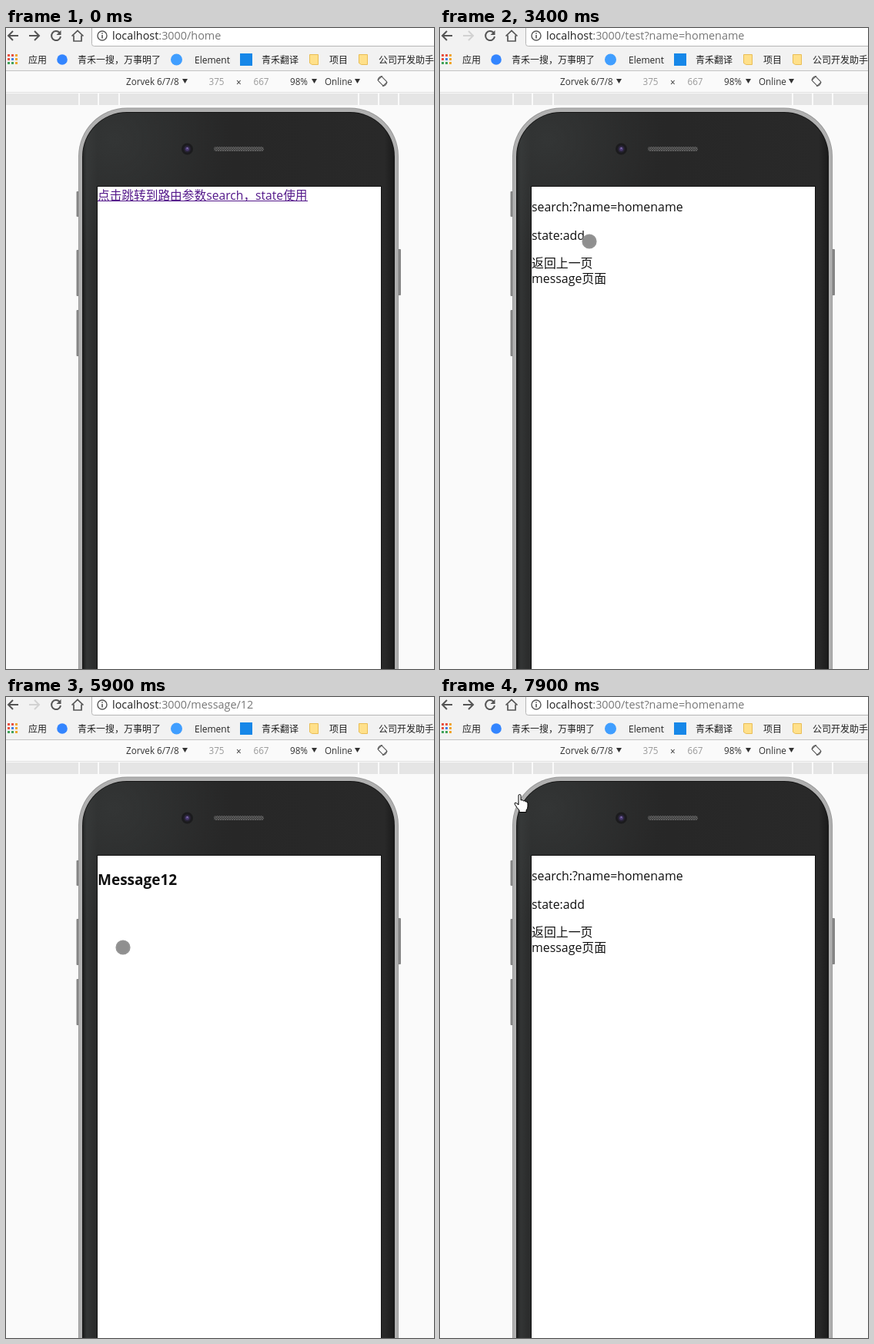
Recreate the animation shown at these times as an HTML page. Size 556 by 832 pixels, loop 8000 ms.

```html
<!DOCTYPE html>
<html lang="zh-CN">
<head>
<meta charset="utf-8">
<title>Router demo</title>
<style>
html, body { margin: 0; width: 100%; height: 100%; overflow: hidden; background: #fafafa; }
svg { display: block; width: 556px; height: 832px; }
text { font-family: "Open Sans", "Noto Sans CJK SC", "Noto Sans CJK", sans-serif; white-space: pre; }
.url { font-size: 14.4px; fill: #777; }
.url tspan { fill: #222; }
.mark { font-size: 12px; fill: #222; }
.tool { font-size: 11.7px; fill: #333; }
.dim { fill: #999; }
.page { font-size: 15.9px; fill: #111; }
.link { font-size: 15.7px; fill: #551a8b; }
.title { font-size: 19px; font-weight: 700; fill: #111; }
.icon { fill: none; stroke: #555; stroke-width: 2; }

.show { animation: 8s step-end infinite; }
#home { animation-name: home; }
#test { animation-name: test; }
#message { animation-name: message; }
#next { animation-name: next; }
#ring { animation-name: ring; }
#dot { animation-name: dot; }
#arrow { animation-name: arrow; }
#hand { animation-name: hand; }
#pointer { animation: travel 8s linear infinite; }

@keyframes home {
  0%, 52.5% { visibility: visible; }
  28.75%, 62.5%, 100% { visibility: hidden; }
}
@keyframes test {
  0%, 52.5%, 72.5% { visibility: hidden; }
  28.75%, 62.5%, 96.25%, 100% { visibility: visible; }
}
@keyframes message {
  0%, 96.25%, 100% { visibility: hidden; }
  72.5% { visibility: visible; }
}
@keyframes next {
  0%, 52.5%, 96.25%, 100% { stroke: #555; }
  28.75%, 62.5% { stroke: #d2d2d2; }
}
@keyframes ring {
  0%, 5%, 27.5%, 100% { visibility: hidden; }
  1.25%, 12.5% { visibility: visible; }
}
@keyframes dot {
  0%, 85%, 100% { visibility: hidden; }
  27.5% { visibility: visible; }
}
@keyframes arrow {
  0%, 12.5%, 98.75%, 100% { visibility: hidden; }
  5%, 85% { visibility: visible; }
}
@keyframes hand {
  0%, 100% { visibility: hidden; }
  98.75% { visibility: visible; }
}
/* Each leg advances once per 100 ms. */
@keyframes travel {
  0%, 1.25% { transform: translate(461px, 819px); animation-timing-function: steps(3); }
  5% { transform: translate(120px, 36px); animation-timing-function: steps(2); }
  7.5% { transform: translate(72px, 90px); animation-timing-function: steps(2); }
  10% { transform: translate(76px, 190px); animation-timing-function: steps(1); }
  11.25% { transform: translate(96px, 204px); animation-timing-function: steps(1); }
  12.5% { transform: translate(123.5px, 210.5px); animation-timing-function: steps(2); }
  15%, 16.25% { transform: translate(165px, 212px); animation-timing-function: steps(2); }
  18.75%, 35% { transform: translate(161.5px, 210px); animation-timing-function: steps(5); }
  41.25% { transform: translate(208px, 262px); animation-timing-function: steps(4); }
  46.25% { transform: translate(152px, 322px); animation-timing-function: steps(2); }
  48.75%, 53.75% { transform: translate(149.5px, 305.5px); animation-timing-function: steps(6); }
  61.25%, 63.75% { transform: translate(176.5px, 219.5px); animation-timing-function: steps(4); }
  68.75%, 75% { transform: translate(152px, 325px); animation-timing-function: steps(4); }
  80%, 82.5% { transform: translate(160px, 232px); animation-timing-function: steps(1); }
  83.75% { transform: translate(149.5px, 207.5px); animation-timing-function: steps(1); }
  85% { transform: translate(130px, 160px); animation-timing-function: steps(4); }
  90%, 95% { transform: translate(8px, 8px); animation-timing-function: steps(3); }
  98.75%, 100% { transform: translate(102px, 126px); }
}
</style>
</head>
<body>
<svg viewBox="0 0 556 832">
  <defs>
    <linearGradient id="body" x1="0" x2="1" y1="0" y2="0">
      <stop offset="0" stop-color="#1c1d1d"/>
      <stop offset=".012" stop-color="#333535"/>
      <stop offset=".045" stop-color="#282929"/>
      <stop offset=".5" stop-color="#272727"/>
      <stop offset=".97" stop-color="#292929"/>
      <stop offset="1" stop-color="#1b1b1b"/>
    </linearGradient>
    <radialGradient id="sheen" gradientUnits="userSpaceOnUse" cx="140" cy="145" r="150">
      <stop offset="0" stop-color="#3c3f3f" stop-opacity=".55"/>
      <stop offset="1" stop-color="#3c3f3f" stop-opacity="0"/>
    </radialGradient>
    <pattern id="mesh" width="3" height="3" patternUnits="userSpaceOnUse">
      <rect width="3" height="3" fill="#3b3b3b"/>
      <path d="M0 0L3 3M3 0L0 3" stroke="#6a6a6a" stroke-width=".7"/>
    </pattern>
    <path id="caret" d="M0 0h7l-3.5 6z" fill="#333"/>
    <path id="folder" d="M.5 .5h11v13h-8l-3-2z" fill="#ffe08a" stroke="#e9bd55"/>
    <g id="site" class="url"><text x="138" y="15"><tspan>localhost</tspan>:3000</text></g>
  </defs>

  <rect width="556" height="832" fill="#fafafa"/>

  <!-- browser bar -->
  <rect width="556" height="55" fill="#f2f2f2"/>
  <rect y="55" width="556" height="1" fill="#c4c4c4"/>
  <rect x="111.5" y="-10" width="460" height="33.5" rx="3" fill="#fff" stroke="#b5b5b5"/>
  <g class="icon">
    <path d="M16 10H3M9 4L3 10L9 16"/>
    <path id="next" class="show" d="M30 10H43M37 4L43 10L37 16"/>
    <path d="M69.5 6A6 6 0 1 0 71 11"/>
    <path d="M71.5 3v6h-6z" fill="#555" stroke="none"/>
    <path d="M85.500 10.500L93 3.500L100.500 10.500M88 9.500V17H98V9.500" stroke-width="1.700"/>
    <circle cx="125" cy="10" r="6" stroke-width="1.4"/>
    <path d="M125 9v4.500M125 6.200v1.600" stroke-width="1.6"/>
  </g>

  <!-- bookmarks -->
  <g>
    <path d="M2 34h3v3h-3zM7 34h3v3h-3zM2 39h3v3h-3z" fill="#e8513f"/>
    <path d="M12 34h3v3h-3zM12 39h3v3h-3zM12 44h3v3h-3z" fill="#f0a52c"/>
    <path d="M2 44h3v3h-3zM7 44h3v3h-3z" fill="#42a35a"/>
    <path d="M7 39h3v3h-3z" fill="#4381e6"/>
    <circle cx="73" cy="41" r="6.800" fill="#3385ff"/>
    <circle cx="221.500" cy="41" r="7.500" fill="#409eff"/>
    <rect x="304" y="33" width="16" height="16" fill="#1687e8"/>
    <use href="#folder" x="394" y="34"/>
    <use href="#folder" x="458" y="34"/>
  </g>
  <g class="mark">
    <text x="29" y="45.500">应用</text>
    <text x="93" y="45.500">青禾一搜，万事明了</text>
    <text x="245" y="45.500">Element</text>
    <text x="332" y="45.500">青禾翻译</text>
    <text x="420" y="45.500">项目</text>
    <text x="484" y="45.500">公司开发助手</text>
  </g>

  <!-- device bar -->
  <rect y="83" width="556" height="1" fill="#e0e0e0"/>
  <g class="tool">
    <text x="156" y="74">Zorvek 6/7/8</text>
    <text class="dim" x="263.500" y="74">375</text>
    <text x="299" y="75">×</text>
    <text class="dim" x="321.500" y="74">667</text>
    <text x="369" y="74">98%</text>
    <text x="414" y="74">Online</text>
  </g>
  <use href="#caret" x="229" y="66"/>
  <use href="#caret" x="397" y="66"/>
  <use href="#caret" x="453" y="66"/>
  <g class="icon" stroke-width="1" style="stroke-width:1.1">
    <rect x="485.500" y="64" width="7" height="10" rx="1" transform="rotate(-45 489 69)"/>
    <path d="M483 68A6.500 6.500 0 0 1 489 62.500M495 70A6.500 6.500 0 0 1 489 75.500"/>
  </g>
  <path d="M0 85h94v15H0zM96 85h23v15H96zM121 85h25v15h-25zM148 85h309v15H148zM459 85h24v15h-24zM485 85h24v15h-24zM511 85h45v15h-45z" fill="#e5e5e5"/>

  <!-- phone -->
  <g fill="#858585">
    <rect x="91.500" y="212" width="5" height="33" rx="1"/>
    <rect x="91.500" y="288" width="5" height="60" rx="1"/>
    <rect x="91.500" y="366" width="5" height="60" rx="1"/>
    <rect x="508" y="287" width="5" height="60" rx="1"/>
  </g>
  <rect x="94" y="103.500" width="416" height="900" rx="63" fill="#999"/>
  <rect x="95" y="104.500" width="414" height="900" rx="62" fill="#b0b0b0"/>
  <rect x="99" y="109" width="406" height="900" rx="58" fill="#151515"/>
  <rect x="100" y="110" width="404" height="900" rx="57" fill="url(#body)"/>
  <rect x="100" y="110" width="404" height="900" rx="57" fill="url(#sheen)"/>
  <circle cx="235.500" cy="157" r="7.500" fill="#1b1b1d"/>
  <circle cx="235.500" cy="157" r="4.500" fill="#292438"/>
  <circle cx="235.500" cy="157" r="2.500" fill="#4b3b73"/>
  <circle cx="235.500" cy="156" r="1" fill="#8a78b5"/>
  <rect x="270" y="154" width="65" height="6" rx="3" fill="url(#mesh)"/>
  <rect x="118" y="205" width="370" height="640" fill="#111"/>
  <rect x="119" y="206" width="368" height="640" fill="#fff"/>

  <!-- pages -->
  <g id="home" class="show">
    <text class="url" x="138" y="15"><tspan>localhost</tspan>:3000/home</text>
    <text class="link" x="119" y="222.500">点击跳转到路由参数search，state使用</text>
    <rect x="119" y="224" width="273" height="1" fill="#551a8b"/>
  </g>
  <g id="test" class="show" visibility="hidden">
    <text class="url" x="138" y="15"><tspan>localhost</tspan>:3000/test?name=homename</text>
    <g class="page">
      <text x="119" y="237.500">search:?name=homename</text>
      <text x="119" y="274.500">state:add</text>
      <text x="119" y="311">返回上一页</text>
      <text x="119" y="331">message页面</text>
    </g>
  </g>
  <g id="message" class="show" visibility="hidden">
    <text class="url" x="138" y="15"><tspan>localhost</tspan>:3000/message/12</text>
    <text class="title" x="119" y="244">Message12</text>
  </g>

  <!-- pointer -->
  <g id="pointer">
    <circle id="ring" class="show" r="10" fill="#000" fill-opacity=".25" stroke="#999" stroke-opacity=".85" stroke-width="2" visibility="hidden"/>
    <circle id="dot" class="show" r="8.700" fill="#000" fill-opacity=".44" stroke="#949494" stroke-width="1.800" visibility="hidden"/>
    <path id="arrow" class="show" d="M.5 .5V16.500L4.200 13L6.800 19L9.200 18L6.700 12H11.500Z" fill="#fff" stroke="#000" visibility="hidden"/>
    <path id="hand" class="show" d="M0 2Q0 .5 1.500 .5T3 2V8Q5.500 6.500 6.300 9Q8.500 7.500 9.300 10Q12 9 12 12V16Q12 19 10 21V23.500H1V21Q-2 18 -5 13Q-5.500 10.500 -3 11.500L0 14Z" fill="#fff" stroke="#000" visibility="hidden"/>
  </g>
</svg>
</body>
</html>
```
